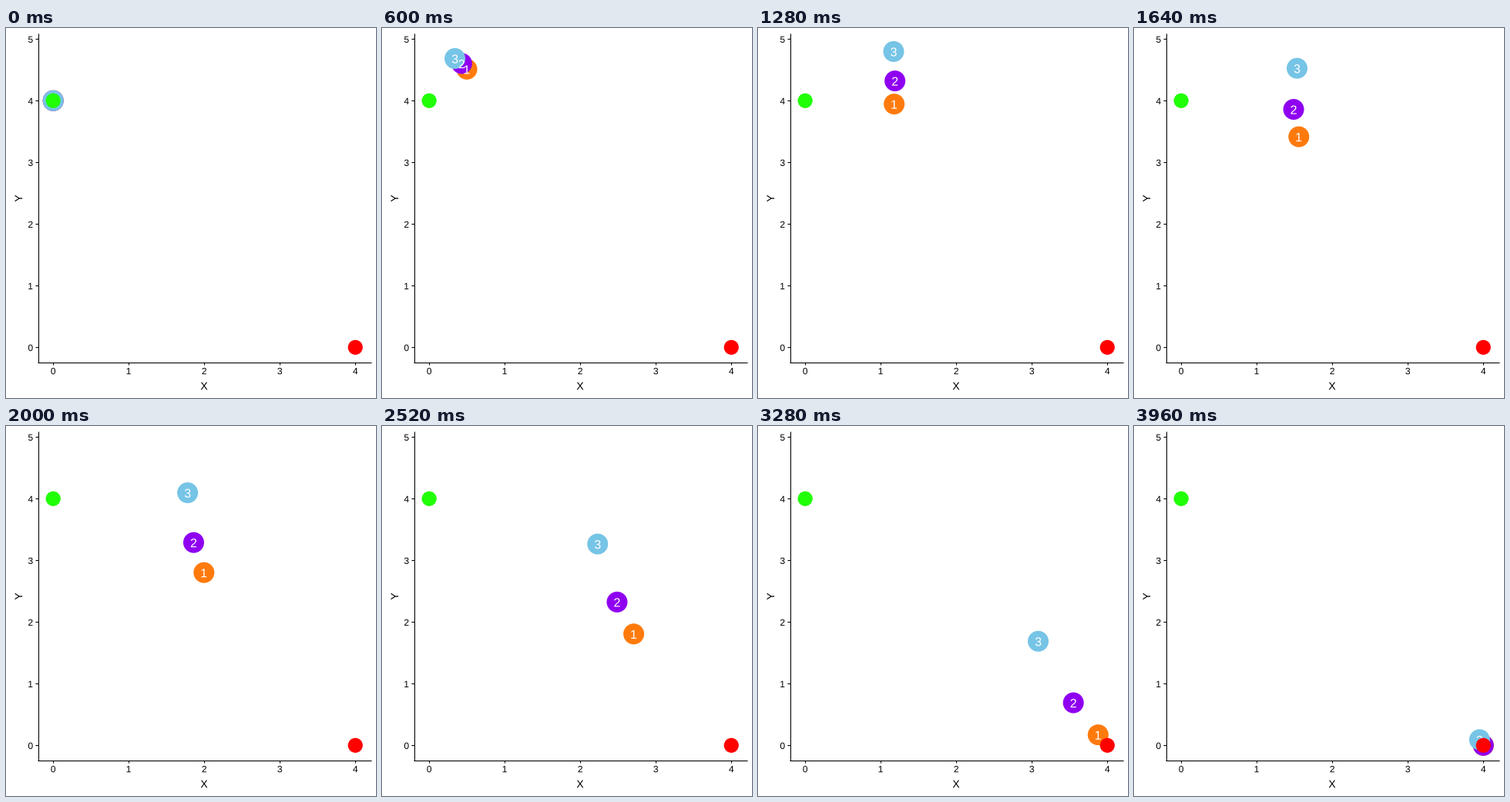
Animation of 480x480 px, one loop 4 s. Source, as a matplotlib script:

```python
import math

import matplotlib.pyplot as plt
import numpy as np
from matplotlib.animation import FuncAnimation
from matplotlib.patches import Circle, PathPatch
from matplotlib.textpath import TextPath
from matplotlib.transforms import Affine2D

plt.rcParams["font.family"] = "Liberation Sans"

SIZE, DPI = 480, 80
FRAMES, STEPS = 100, 41
START_Y, GOAL_X = 4, 4

# colour, turning radius, steps spent turning, top speed, speed-up time
RACERS = [
    ("#ff7a0c", 0.511, 10.32, 0.280, 11.5),
    ("#8f00f0", 0.637, 13.08, 0.280, 11.5),
    ("#76c4e6", 0.857, 18.12, 0.320, 16.5),
]

fig = plt.figure(figsize=(SIZE / DPI, SIZE / DPI), dpi=DPI, facecolor="white")
ax = fig.add_axes([0, 0, 1, 1])
ax.set_xlim(0, SIZE)
ax.set_ylim(0, SIZE)
ax.axis("off")


def to_px(x, y):
    return 61.2 + 98 * x, 65.7 + 80 * y


def line(x0, y0, x1, y1):
    ax.plot([x0, x1], [y0, y1], color="black", lw=1.07 * 72 / DPI,
            solid_capstyle="butt")


def place(patch, x, y, turn=0):
    patch.set_transform(Affine2D().rotate_deg(turn).translate(x, y) + ax.transData)


def label(text, size, color="black", z=2):
    """Text as a shape centred on the origin, so that it moves smoothly."""
    path = TextPath((0, 0), text, size=size)
    box = path.get_extents()
    shift = Affine2D().translate(-(box.x0 + box.x1) / 2, -0.35 * size)
    patch = PathPatch(shift.transform_path(path), fc=color, lw=0, zorder=z)
    ax.add_patch(patch)
    return patch


def disc(x, y, r, color, z):
    patch = Circle((x, y), r, fc=color, lw=0, zorder=z)
    ax.add_patch(patch)
    return patch


def draw_axes():
    left, base = 41.5, 46.5
    line(left, base - 0.5, left, 473.5)
    line(left - 0.5, base, 473.5, base)
    for n in range(6):
        y = to_px(0, n)[1]
        line(left - 3.7, y, left, y)
        place(label(str(n), 12), 31.8, y - 0.5)
    for n in range(5):
        x = to_px(n, 0)[0]
        line(x, base - 3.7, x, base)
        place(label(str(n), 12), x, 35)
    place(label("X", 14), 257, 15.7)
    place(label("Y", 14), 16.3, 259, 90)


def position(step, radius, turn_steps, top, tau):
    """Circle to the right, then speed up along the tangent to the goal."""
    dx, dy = GOAL_X - radius, -START_Y
    exit_angle = math.atan2(dy, dx) + math.acos(radius / math.hypot(dx, dy))
    sweep = math.pi - exit_angle
    if step <= turn_steps:
        a = sweep * step / turn_steps
        return radius * (1 - math.cos(a)), START_Y + radius * math.sin(a)
    t = step - turn_steps
    speed = radius * sweep / turn_steps
    run = top * t - (top - speed) * tau * (1 - math.exp(-t / tau))
    x = radius * (1 + math.cos(exit_angle))
    y = START_Y + radius * math.sin(exit_angle)
    part = min(1, run / math.hypot(GOAL_X - x, y))
    return x + part * (GOAL_X - x), y * (1 - part)


draw_axes()
discs = [disc(0, 0, 13.5, r[0], 3 + i / 10) for i, r in enumerate(RACERS)]
digits = [label(str(i + 1), 16, "white", 4) for i in range(len(RACERS))]
disc(*to_px(0, START_Y), 9.6, "#21ff06", 5)
disc(*to_px(GOAL_X, 0), 9.6, "#ff0000", 5)

# each simulation step falls on a whole frame, with linear motion between
step_frames = np.round(np.arange(STEPS + 1) * (FRAMES - 1) / STEPS)


def update(frame):
    step = np.interp(frame, step_frames, np.arange(STEPS + 1))
    for racer, ball, digit in zip(RACERS, discs, digits):
        x, y = to_px(*position(step, *racer[1:]))
        ball.center = x, y
        place(digit, x, y - 0.5)
    return discs + digits


anim = FuncAnimation(fig, update, frames=FRAMES, interval=40,
                     init_func=lambda: update(0), repeat=True, repeat_delay=0)
plt.show()
```
